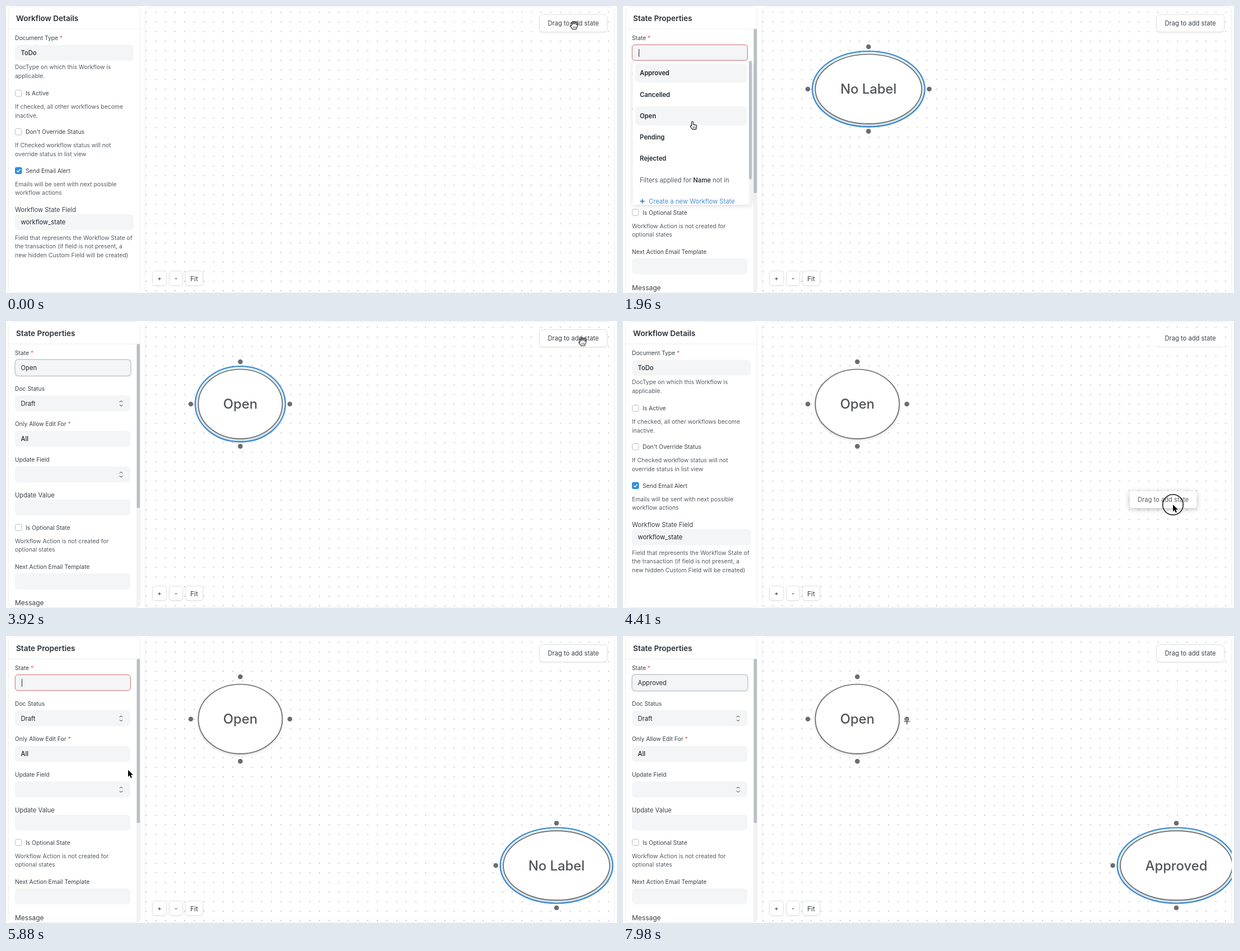
An HTML page that plays this animation: 1091 by 514 pixels, repeating every 8 s.

```html
<!DOCTYPE html>
<html lang="en">
<head>
<meta charset="utf-8">
<title>Workflow builder</title>
<style>
html, body { margin: 0; height: 100%; overflow: hidden; background: #fff; }
svg { display: block; width: 100vw; height: 100vh; }
text { font: 10.3px Inter, sans-serif; fill: #3b4148; dominant-baseline: central; }
.title { font-size: 13.55px; font-weight: 600; fill: #2a3036; }
.help { font-size: 10.38px; fill: #565c63; }
.mid { font-size: 11.2px; }
.big { font-size: 12px; }
.val { font-size: 11.2px; fill: #1f272e; }
.med { font-weight: 500; }
.row { font-size: 11.2px; font-weight: 600; fill: #1f272e; }
.req { fill: #e05656; }
.label { font-size: 23.8px; font-weight: 500; fill: #525558; text-anchor: middle; }
.c { text-anchor: middle; }
.card { fill: #fff; stroke: #ededee; }
.in { fill: #f4f5f6; }
.focus { fill: #f4f5f6; stroke: #cdd1d5; stroke-width: 1.8; }
.check { fill: #fff; stroke: #b9bfc5; }
.btn { fill: #fff; stroke: #dfe0e2; }
.lift { filter: drop-shadow(0 1px 1px #0001); }
.shape { fill: #fff; stroke: #67696c; stroke-width: 1.7; }
.ring { fill: #f2f5f6; stroke: #3a87d3; stroke-width: 2.4; }
.glow { fill: none; stroke: #d9f3f8; stroke-width: 2; }
.dot { fill: #6a6d70; }
.ink { fill: none; stroke: #222; }
.halo { fill: none; stroke: #fff; stroke-width: 3; }
.hand { fill: #fff; stroke: #111; stroke-width: 1.1; stroke-linejoin: round; }

/* The clock moves --d, so every animation is held at the current step. */
.k { animation: 8s step-end infinite both paused; animation-delay: var(--d, 0s); }
.details { animation-name: details; }
.props { animation-name: props; }
.idle { animation-name: idle; }
.red { animation-name: red; }
.open { animation-name: open; }
.openCaret { animation-name: openCaret; }
.appr { animation-name: appr; }
.apprCaret { animation-name: apprCaret; }
.menu { animation-name: menu; }
.hover { animation-name: hover; }
.new1 { animation-name: new1; }
.node1 { animation-name: node1; }
.sel1 { animation-name: sel1; }
.new2 { animation-name: new2; }
.node2 { animation-name: node2; }
.path { animation-name: path; }
.ghost { animation-name: ghost; }
.fist { animation-name: fist; }
.arrow { animation-name: arrow; }
.press { animation-name: press; }
.point { animation-name: point; }
.beam { animation-name: beam; }
.rest { animation-name: rest; }
.cross { animation-name: cross; }

@keyframes details { 0%, 52.94% { opacity: 1 } 10.06%, 67.81%, 100% { opacity: 0 } }
@keyframes props { 0%, 52.94% { opacity: 0 } 10.06%, 67.81%, 100% { opacity: 1 } }
@keyframes idle { 0%, 10.06%, 67.81%, 100% { opacity: 1 } .44%, 52.94% { opacity: 0 } }
@keyframes red { 0%, 34.56%, 88.81%, 100% { opacity: 0 } 10.06%, 67.81% { opacity: 1 } }
@keyframes open { 0%, 52.94%, 100% { opacity: 0 } 34.56% { opacity: 1 } }
@keyframes openCaret { 0%, 43.31%, 52.06%, 100% { opacity: 0 } 34.56%, 49.44% { opacity: 1 } }
@keyframes appr { 0% { opacity: 0 } 88.81%, 100% { opacity: 1 } }
@keyframes apprCaret { 0%, 95.81%, 100% { opacity: 0 } 88.81% { opacity: 1 } }
@keyframes menu { 0%, 34.56%, 88.81%, 100% { opacity: 0 } 21.44%, 75.69% { opacity: 1 } }
@keyframes hover { 0%, 34.56%, 100% { opacity: 0 } 23.19% { opacity: 1 } }
@keyframes new1 { 0%, 35.44%, 100% { opacity: 0 } 10.06% { opacity: 1 } }
@keyframes node1 { 0% { opacity: 0 } 35.44%, 100% { opacity: 1 } }
@keyframes sel1 { 0%, 52.94%, 100% { opacity: 0 } 35.44% { opacity: 1 } }
@keyframes new2 { 0%, 89.69%, 100% { opacity: 0 } 67.81% { opacity: 1 } }
@keyframes node2 { 0% { opacity: 0 } 89.69%, 100% { opacity: 1 } }
@keyframes ghost {
  0%, 9.19% { opacity: 0; transform: translate(-1px, -5px) }
  .44% { opacity: 1; transform: translate(-1px, -5px) }
  52.06% { opacity: 1; transform: translate(-17.5px, -9px) }
  66.94%, 100% { opacity: 0; transform: translate(-17.5px, -9px) }
}
@keyframes fist { 0%, 47.69% { opacity: 1 } 10.06%, 52.06%, 100% { opacity: 0 } }
@keyframes arrow { 0%, 21.44%, 47.69%, 74.81%, 98.44%, 100% { opacity: 0 } 10.06%, 38.94%, 52.06%, 89.69% { opacity: 1 } }
@keyframes press { 0%, 66.94%, 100% { opacity: 0 } 52.06% { opacity: 1 } }
@keyframes point { 0%, 35.44%, 89.69%, 100% { opacity: 0 } 22.31%, 81.81% { opacity: 1 } }
@keyframes beam { 0%, 22.31%, 38.94%, 81.81%, 100% { opacity: 0 } 21.44%, 35.44%, 74.81% { opacity: 1 } }
@keyframes rest { 0%, 38.94%, 100% { opacity: 0 } 38.06% { opacity: 1 } }
@keyframes cross { 0% { opacity: 0 } 98.44%, 100% { opacity: 1 } }

.path { animation-timing-function: ease-in-out; }
@keyframes path {
  0% { transform: translate(1014px, 35px) }
  6.125%, 8.75% { transform: translate(453px, 155px) }
  15.75%, 18.375% { transform: translate(404px, 165px) }
  21.875% { transform: translate(122px, 106px) }
  24.5% { transform: translate(124px, 207px) }
  28.875%, 29.75% { transform: translate(116px, 215px) }
  32.375%, 37.625% { transform: translate(113px, 197px) }
  38.5% { transform: translate(101px, 196px) }
  48.125% { transform: translate(1028px, 36px) }
  49.875%, 51.625% { transform: translate(1030.5px, 39px); animation-timing-function: ease-out }
  55.125% { transform: translate(982px, 329px) }
  62.125% { transform: translate(989px, 419px) }
  63.875%, 66.5% { transform: translate(990px, 420px) }
  69.125%, 70.875% { transform: translate(600px, 398px); animation-timing-function: ease-in-out }
  73.5% { transform: translate(218px, 240px); animation-timing-function: ease-out }
  76.125% { transform: translate(118px, 97px) }
  81.375% { transform: translate(112px, 104px) }
  85.75%, 88.375% { transform: translate(116px, 115px) }
  98.875%, 100% { transform: translate(507px, 153px) }
}
</style>
</head>
<body>
<svg viewBox="0 0 1091 514" preserveAspectRatio="none">
  <defs>
    <pattern id="dots" x="241.7" y="2.7" width="17.2" height="17.2" patternUnits="userSpaceOnUse">
      <circle cx="8.6" cy="8.6" r=".8" fill="#8e8e96"/>
    </pattern>
    <clipPath id="stage"><rect x="248" y="1" width="838.5" height="513" rx="8"/></clipPath>
    <clipPath id="side"><rect x="5" y="2" width="234.5" height="511" rx="8"/></clipPath>
    <path id="ibeam" d="M-3-7.2q2.5 0 3 1.4q.5-1.4 3-1.4M0-6V6M-3 7.2q2.5 0 3-1.4q.5 1.4 3 1.4M-1.6.8h3.2"/>
    <path id="sort" d="M-2.6-2.2l2.6-2.6 2.6 2.6M-2.6 2.4l2.6 2.6 2.6-2.6" class="ink"/>
  </defs>

  <rect class="card" x="4.5" y="1.5" width="235" height="512" rx="8"/>
  <rect class="card" x="248.5" y="1.5" width="838" height="512" rx="8"/>
  <rect x="249" y="2" width="829" height="511" fill="url(#dots)"/>

  <g id="nodes" clip-path="url(#stage)"></g>

  <g class="lift">
    <rect class="btn" x="261.5" y="474.5" width="25" height="26" rx="5"/>
    <rect class="btn" x="291.5" y="474.5" width="24" height="26" rx="5"/>
    <rect class="btn" x="320.5" y="474.5" width="31" height="26" rx="5"/>
  </g>
  <g class="c">
    <text class="mid med" x="274" y="488">+</text>
    <text class="mid med" x="303.5" y="488">-</text>
    <text class="big" x="336" y="488">Fit</text>
  </g>

  <rect x="953" y="15" width="120" height="31" rx="6" fill="#fff"/>
  <path d="M956 46.5H1071" stroke="#e3e4e5"/>
  <rect class="btn lift k idle" x="952.5" y="15.5" width="121" height="31" rx="6"/>
  <text class="mid c" x="1013" y="31">Drag to add state</text>

  <path d="M5 41H239" stroke="#ededee"/>

  <g class="k details">
    <text class="title" x="18" y="21.5">Workflow Details</text>
    <text x="16" y="57">Document Type<tspan class="req" dx="3">*</tspan></text>
    <rect class="in" x="16" y="69.5" width="212" height="28.5" rx="6"/>
    <text class="val med" x="26.5" y="84">ToDo</text>
    <text class="help" x="16" y="109.5">DocType on which this Workflow is</text>
    <text class="help" x="16" y="125.5">applicable.</text>
    <rect class="check" x="16.5" y="150.5" width="11.5" height="11.5" rx="3"/>
    <text x="35" y="156">Is Active</text>
    <text class="help" x="16" y="180.5">If checked, all other workflows become</text>
    <text class="help" x="16" y="196">inactive.</text>
    <rect class="check" x="16.5" y="219.5" width="11.5" height="11.5" rx="3"/>
    <text x="35" y="225">Don't Override Status</text>
    <text class="help" x="16" y="249.5">If Checked workflow status will not</text>
    <text class="help" x="16" y="265">override status in list view</text>
    <rect x="16" y="288.5" width="12.5" height="12.5" rx="3" fill="#2f8fe0"/>
    <path d="M19.3 295l2.2 2.2 4-4.6" fill="none" stroke="#fff" stroke-width="1.5"/>
    <text x="35" y="294.5">Send Email Alert</text>
    <text class="help" x="16" y="319">Emails will be sent with next possible</text>
    <text class="help" x="16" y="334.5">workflow actions</text>
    <text class="mid" x="16" y="364.5">Workflow State Field</text>
    <rect class="in" x="16" y="373" width="212" height="28.5" rx="6"/>
    <text class="val" x="26.5" y="387">workflow_state</text>
    <text class="help" x="16" y="415">Field that represents the Workflow State of</text>
    <text class="help" x="16" y="430.5">the transaction (if field is not present, a</text>
    <text class="help" x="16" y="446">new hidden Custom Field will be created)</text>
  </g>

  <g class="k props" clip-path="url(#side)">
    <text class="title" x="18" y="21.5">State Properties</text>
    <rect x="233" y="41" width="6.5" height="473" fill="#f2f2f3"/>
    <rect x="233.5" y="41" width="5.5" height="294" rx="2" fill="#b9bfc5"/>
    <text x="16" y="57">State<tspan class="req" dx="3">*</tspan></text>
    <text x="16" y="120.5">Doc Status</text>
    <rect class="in" x="16" y="133" width="206" height="28.5" rx="6"/>
    <text class="val" x="26.5" y="147.5">Draft</text>
    <use href="#sort" x="205.5" y="147.7"/>
    <text x="16" y="184">Only Allow Edit For<tspan class="req" dx="3">*</tspan></text>
    <rect class="in" x="16" y="197" width="206" height="28" rx="6"/>
    <text class="val med" x="26.5" y="211">All</text>
    <text x="16" y="248">Update Field</text>
    <rect class="in" x="16" y="260.5" width="206" height="28.5" rx="6"/>
    <use href="#sort" x="205.5" y="275"/>
    <text class="mid" x="16" y="311.5">Update Value</text>
    <rect class="in" x="16" y="320" width="206" height="28" rx="6"/>
    <rect class="check" x="16.5" y="364" width="11.5" height="11.5" rx="3"/>
    <text x="35" y="369.5">Is Optional State</text>
    <text class="help" x="16" y="394">Workflow Action is not created for</text>
    <text class="help" x="16" y="409.5">optional states</text>
    <text x="16" y="440">Next Action Email Template</text>
    <rect class="in" x="16" y="452" width="206" height="28.5" rx="6"/>
    <text class="big" x="16" y="504">Message</text>
  </g>

  <g class="k red">
    <rect x="16.3" y="69.4" width="206" height="28.3" rx="5" fill="#f4f5f6" stroke="#cb6a6a"/>
    <path d="M28.5 77V91" stroke="#222"/>
  </g>
  <g class="k open">
    <rect class="focus" x="16" y="69" width="207" height="29.5" rx="6"/>
    <text class="val" x="26.5" y="84">Open</text>
  </g>
  <path class="k openCaret" d="M56.5 77.5V91" stroke="#222"/>
  <g class="k appr">
    <rect class="focus" x="16" y="69" width="207" height="29.5" rx="6"/>
    <text class="val" x="26.5" y="84">Approved</text>
  </g>
  <path class="k apprCaret" d="M79 77.5V91" stroke="#222"/>

  <g class="k menu">
    <rect x="17" y="98.5" width="213" height="257.5" rx="4" fill="#fff" style="filter: drop-shadow(0 2px 4px #0002)"/>
    <rect x="224.5" y="98.5" width="5.5" height="257" fill="#f4f4f5"/>
    <rect x="225" y="98.5" width="5" height="212" rx="2" fill="#bcc2c8"/>
    <rect class="in" x="22" y="103.5" width="199" height="33.5" rx="6"/>
    <rect class="in k hover" x="22" y="180" width="199" height="33.5" rx="6"/>
    <text class="row" x="30" y="120">Approved</text>
    <text class="row" x="30" y="158.5">Cancelled</text>
    <text class="row" x="30" y="197">Open</text>
    <text class="row" x="30" y="235">Pending</text>
    <text class="row" x="30" y="273">Rejected</text>
    <text class="help mid" x="30" y="311.5" style="font-size: 11.2px">Filters applied for <tspan font-weight="600" fill="#333a40">Name</tspan> not in</text>
    <path d="M30.5 349.7h8M34.5 345.7v8" stroke="#3f86c4" stroke-width="1.9"/>
    <text class="mid" x="46" y="350" style="fill: #4b8ec8">Create a new Workflow State</text>
  </g>

  <g class="k rest" transform="translate(113 197)">
    <use href="#ibeam" class="halo"/><use href="#ibeam" class="ink" stroke-width="1.2"/>
  </g>

  <g class="k path">
    <g class="k ghost">
      <rect x="-60" y="-15.5" width="120" height="30.5" rx="5" fill="#fff" style="filter: drop-shadow(0 2px 5px #0004)"/>
      <text class="mid c" x="0" y="0" style="fill: #5c6064">Drag to add state</text>
    </g>
    <circle class="k press" r="18.3" fill="none" stroke="#111" stroke-width="1.5"/>
    <g class="k fist">
      <g transform="translate(0 -.3)">
        <path class="hand" d="M-4.2 1.2L-5.6-3.2c-.3-1.5 1.5-2 2.1-.6l1 2.4-.9-4.2c-.2-1.5 1.7-1.8 2.1-.3l.8 3.6.1-4c.1-1.5 2.1-1.5 2.2 0l.1 4 1.1-3.5c.5-1.4 2.3-.9 2.1.5L4.4-1l.7-1.2c.8-1.3 2.2-.5 1.8.9L5.7 2.6C5.2 4.6 4.2 5.2 4 7h-6.4C-2.8 5.6-5.6 3.2-6.5 1.5c-.6-1.3 1.2-1.8 2.3-.3z"/>
        <path class="ink" d="M-1.2 2v2.8M.8 2v2.8M2.8 2v2.8" stroke-width=".8"/>
      </g>
    </g>
    <path class="k arrow" d="M0 0v12.2l2.8-2.6 2 4.6 2.1-.9-2-4.5h4z" stroke="#fff" stroke-width="1.3" paint-order="stroke"/>
    <g class="k point">
      <path class="hand" d="M-1.5 8V1.2a1.4 1.4 0 0 1 2.8 0V5.2l4.8.9c1.2.3 1.7 1 1.6 2.2l-.7 3.6-.9 2h-6l-3.6-4.6c-.9-1.3.6-2.6 2-1.3z"/>
      <path class="ink" d="M1.4 8.7v3M3.3 8.7v3M5.1 8.7v3" stroke-width=".8"/>
    </g>
    <g class="k beam"><use href="#ibeam" class="halo"/><use href="#ibeam" class="ink" stroke-width="1.2"/></g>
    <g class="k cross">
      <path class="halo" d="M-5.5 0h11M0-5.5v11"/>
      <path class="ink" d="M-5.5 0h11M0-5.5v11" stroke-width="1.2"/>
    </g>
  </g>
</svg>
<script>
const LOOP = 8000, STEP = 70;

// A state bubble: left edge, centre height, half width, label, and when it shows.
function bubble(left, cy, rx, label, show, selected) {
  const cx = left + rx, ry = 62.2;
  const oval = (cls, grow) =>
    `<ellipse class="${cls}" cx="${cx}" cy="${cy}" rx="${rx + grow}" ry="${ry + grow}"/>`;
  const knobs = [[-rx - 13.4, 0], [rx + 13.4, 0], [0, -75.7], [0, 75.7]]
    .map(([x, y]) => `<circle class="dot" cx="${cx + x}" cy="${cy + y}" r="4.3"/>`).join("");
  return `<g class="k ${show}">
    <g class="${selected}">${oval("ring", 5.4)}${oval("glow", 3.2)}</g>
    <g style="filter: drop-shadow(0 2px 2px #0002)">${oval("shape", 0)}</g>
    ${knobs}<text class="label" x="${cx}" y="${cy}">${label}</text></g>`;
}

document.getElementById("nodes").innerHTML =
  bubble(343.4, 148.7, 95, "No Label", "new1", "") +
  bubble(343.4, 148.7, 75, "Open", "node1", "k sel1") +
  bubble(888, 411, 95, "No Label", "new2", "") +
  bubble(888, 411, 100, "Approved", "node2", "");

function tick(now) {
  const t = Math.floor((now % LOOP) / STEP) * STEP;
  document.documentElement.style.setProperty("--d", `${-t}ms`);
  requestAnimationFrame(tick);
}
requestAnimationFrame(tick);
</script>
</body>
</html>
```
